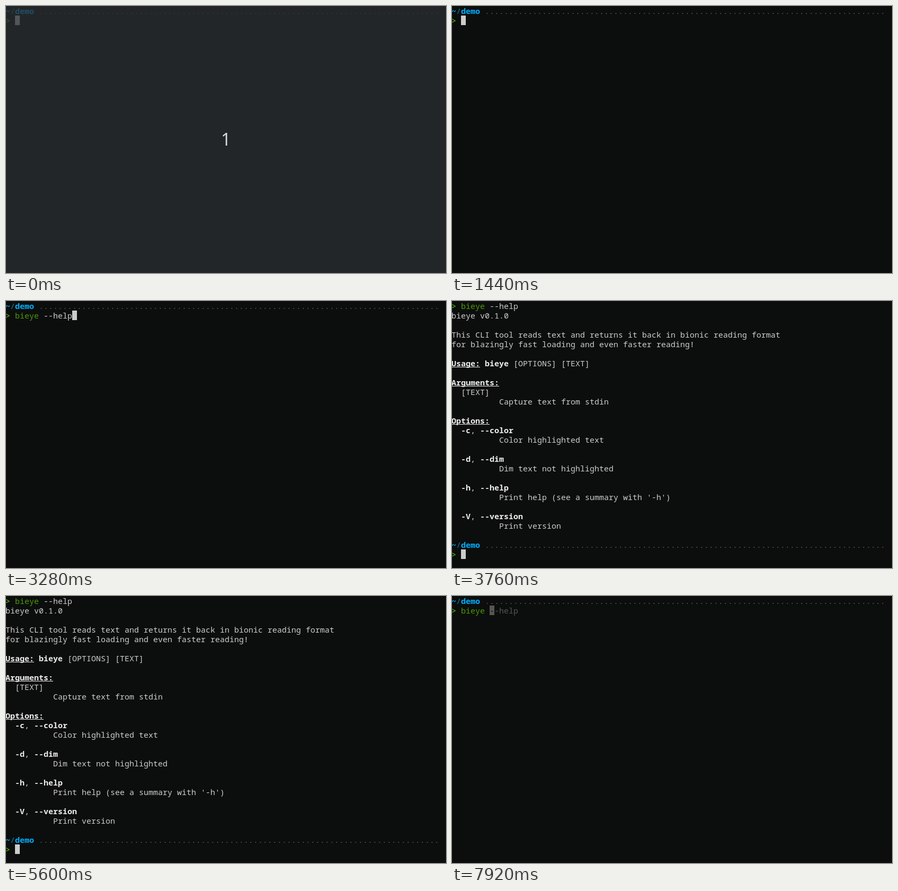
Write an HTML page that moves like this. It is 831 px wide and 503 px high and loops after 8 s.

```html
<!DOCTYPE html>
<html lang="en">
<head>
<meta charset="utf-8">
<title>Terminal demo</title>
<style>
  html, body { margin: 0; width: 100%; height: 100%; overflow: hidden; background: #0c0e0d; }
  svg { display: block; }
  text { font: 15px "Noto Sans Mono", monospace; white-space: pre; font-variant-ligatures: none; }
  .bold { font-weight: 700; }
  .count { font: 32px "Noto Sans", sans-serif; }
</style>
</head>
<body>
<svg id="stage" width="831" height="503" viewBox="0 0 831 503"></svg>
<script>
const stage = document.getElementById('stage');
const LOOP = 8000, CELL = 9, LINE = 18;
const BG = '#0c0e0d', FG = '#cccccc', BRIGHT = '#eeeeec', DIM = '#555753';
const GREEN = '#4e9a06', RED = '#cc0000', ARROW = '#5fd700';
const PATH = '#00afff', SLASH = '#0087af', DOTS = '#585858';

const HELLO = 'bieye "Hello there, how is your day going?" --dim';
const HELP = 'bieye --help';

// *bold*, _bold underlined_
const helpText = `bieye v0.1.0

This CLI tool reads text and returns it back in bionic reading format
for blazingly fast loading and even faster reading!

_Usage:_ *bieye* [OPTIONS] [TEXT]

_Arguments:_
  [TEXT]
          Capture text from stdin

_Options:_
  *-c*, *--color*
          Color highlighted text

  *-d*, *--dim*
          Dim text not highlighted

  *-h*, *--help*
          Print help (see a summary with '-h')

  *-V*, *--version*
          Print version`.split('\n');

// time, typed text, cursor shown, screen
const steps = [
  [0, '', 1, 'count'],
  [80, '', 1], [320, '', 0], [720, '', 1], [1200, '', 0], [1440, '', 1],
  [1600, 'b', 1], [1840, 'bi', 1], [2080, 'bie', 1], [2160, 'biey', 1],
  [2320, 'bieye', 1], [2640, 'bieye ', 1],
  [2800, 'bieye -', 1], [2880, 'bieye --', 1], [2960, 'bieye --h', 1],
  [3200, 'bieye --he', 1], [3280, HELP, 1],
  [3760, '', 1, 'help'], [4160, '', 0, 'help'], [4640, '', 1, 'help'],
  [5120, '', 0, 'help'], [5600, '', 1, 'help'],
  [5920, '', 1], [6320, '', 0], [6800, '', 1],
  [7200, 'b', 1], [7600, 'biey', 1], [7680, 'bieye', 1], [7920, 'bieye ', 1]
];

const colX = col => col * CELL - 1;
const escapeText = s => s.replace(/&/g, '&amp;').replace(/</g, '&lt;').replace(/>/g, '&gt;');

function rect(x, y, w, h, fill) {
  return `<rect x="${x}" y="${y}" width="${w}" height="${h}" fill="${fill}"/>`;
}

function put(row, col, str, fill, bold) {
  if (!str.trim()) return '';
  return `<text x="${colX(col)}" y="${row * LINE + 15}" fill="${fill}"` +
    `${bold ? ' class="bold"' : ''}>${escapeText(str)}</text>`;
}

function command(row, str) {
  const name = str.split(' ')[0];
  const known = name === 'bieye';
  return put(row, 0, '>', ARROW) +
    put(row, 2, name, known ? GREEN : RED, !known) +
    put(row, 2 + name.length, str.slice(name.length), FG);
}

function prompt(row, typed, cursor, history) {
  const match = typed && history.find(h => h.startsWith(typed));
  const rest = match ? match.slice(typed.length) : '';
  const col = 2 + typed.length;
  let out = put(row, 0, '~', PATH, true) + put(row, 1, '/', SLASH) +
    put(row, 2, 'demo', PATH, true) + put(row, 7, '.'.repeat(84), DOTS) +
    command(row + 1, typed) + put(row + 1, col + 1, rest.slice(1), DIM);
  if (cursor) {
    out += rect(colX(col), (row + 1) * LINE, CELL, LINE, rest ? DIM : FG) +
      put(row + 1, col, rest.slice(0, 1), BG);
  }
  return out;
}

function helpLine(row, line) {
  let out = '', col = 0;
  for (const part of line.split(/(\*[^*]+\*|_[^_]+_)/)) {
    const styled = /^[*_]/.test(part);
    const str = styled ? part.slice(1, -1) : part;
    out += put(row, col, str, styled ? BRIGHT : FG, styled);
    if (part[0] === '_') out += rect(colX(col), row * LINE + 16, str.length * CELL, 1, BRIGHT);
    col += str.length;
  }
  return out;
}

function draw([time, typed, cursor, screen]) {
  const history = time < 3760 ? [HELLO, HELP] : [HELP, HELLO];
  let out = rect(0, 0, 831, 503, BG);
  if (screen === 'help') {
    out += command(0, HELP) + helpText.map((line, i) => helpLine(i + 1, line)).join('');
  }
  out += prompt(screen === 'help' ? 25 : 0, typed, cursor, history);
  if (screen === 'count') {
    out += rect(0, 0, 831, 503, 'rgba(43,46,50,0.75)') +
      '<text class="count" x="415.5" y="263" text-anchor="middle" fill="#d8d9da">1</text>';
  }
  stage.innerHTML = out;
}

let shown = null;
function tick() {
  const t = performance.now() % LOOP;
  const step = steps.filter(s => s[0] <= t).pop();
  if (step !== shown) draw(shown = step);
  requestAnimationFrame(tick);
}
tick();
</script>
</body>
</html>
```
